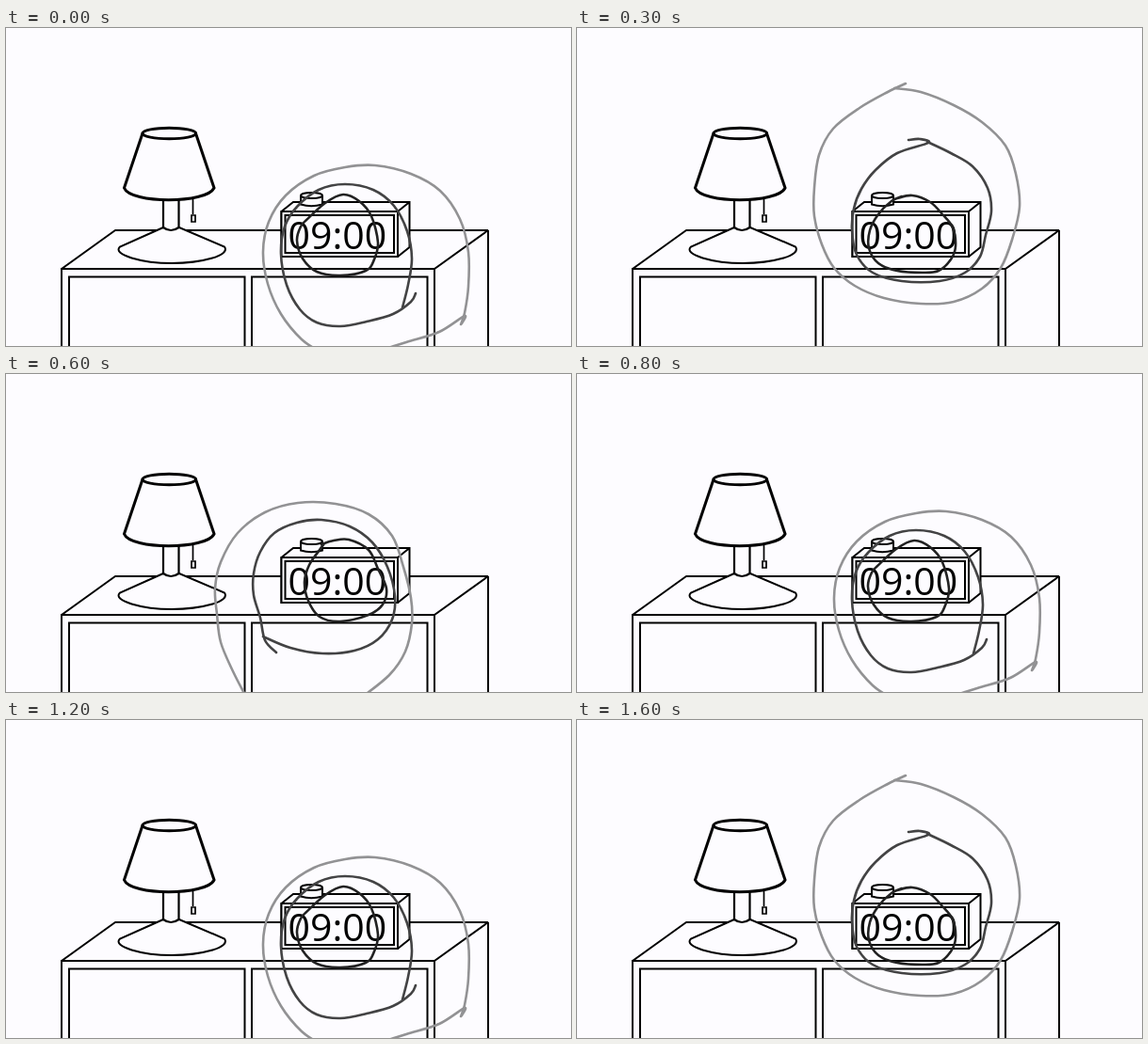
An HTML page for the animation above (1700 ms loop, 600 px wide and 338 px high).

```html
<!DOCTYPE html>
<html lang="en">
<head>
<meta charset="utf-8">
<title>Ringing alarm clock</title>
<style>
  html, body { margin: 0; width: 100%; height: 100%; overflow: hidden; background: #fdfcff; }
  svg { display: block; width: 600px; height: 338px; }
  .scene { fill: #fdfcff; stroke: #000; stroke-width: 2; }
  .lamp { stroke-width: 2.2; }
  .shade { stroke-width: 3; }
  .thin { stroke-width: 1.7; }
  text { font: 41px "Open Sans", "Noto Sans", sans-serif; fill: #000; stroke: none; }
  .pose { fill: none; stroke-width: 2.6; stroke-linecap: round; stroke-linejoin: round; }
  .pose :nth-child(1) { stroke: #222; }
  .pose :nth-child(2) { stroke: #434344; }
  .pose :nth-child(3) { stroke: #929294; }
</style>
</head>
<body>
<svg viewBox="0 0 600 338">
  <g class="scene">
    <!-- dresser -->
    <path d="M59 256L116 215H512L455 256M512 215V345" stroke-linejoin="bevel"/>
    <path d="M59 345V256H455V345M67 345V264.5H253.5V345M261 345V264.5H447.5V345"/>
    <!-- lamp -->
    <g class="lamp">
      <path d="M167 212L121 232.500C112 241 145 250 176 250C207 250 239 242 232 232.500L184 212Z" stroke-width="2"/>
      <path d="M167 180V212Q175 218 183.500 212V180"/>
      <path class="thin" d="M198.500 180V198M197 199H201V206H197Z"/>
      <g class="shade">
        <path d="M145 112L125.500 170C132 187 213 187 221 170L201.500 112Z"/>
        <ellipse cx="173.300" cy="112" rx="28.200" ry="5.800"/>
      </g>
    </g>
    <!-- clock -->
    <path d="M292.500 195L305 185H428.500V233L416 243H292.500ZM416 195L428.500 185"/>
    <path d="M292.500 195H416V243H292.500ZM296.500 199H412V239H296.500Z"/>
    <path d="M313 178V187.500Q324 191 336 187.500V178"/>
    <ellipse cx="324.500" cy="178" rx="11.500" ry="3"/>
    <text x="299.500" y="235">09:00</text>
  </g>

  <!-- sound rings, inner to outer -->
  <g class="pose">
    <polyline points="318,205 339,186 358,177 375,184 388,200 395,228 391,246 382,258 355,263 330,259 315,245 309,226 313,211 320,203"/>
    <polyline points="435,282 430,291 411,304 383,312 355,317 330,313 312,299 298,273 292,240 296,211 309,190 332,172 360,166 390,172 412,189 426,216 431,245 427,273 421,297"/>
    <polyline points="335,345 314,331 292,304 278,272 273,238 279,206 297,178 327,157 360,148 392,146 430,155 461,173 482,203 491,238 491,275 487,303 483,315 487,306 460,323 425,334 390,345"/>
  </g>
  <g class="pose">
    <polyline points="335,181 348,177 364,176 385,187 395,207 404,228 400,245 385,256 355,263 333,258 321,241 317,221 322,203 333,187 338,180"/>
    <polyline points="287,296 275,283 270,259 263,235 263,212 270,189 285,169 309,158 335,155 365,162 389,179 405,205 413,236 410,261 395,282 370,294 336,297 302,291 273,279"/>
    <polyline points="256,345 241,316 228,285 224,255 222,228 228,200 246,169 275,147 310,137 350,138 385,149 410,172 422,205 430,238 431,265 424,295 407,320 376,345"/>
  </g>
  <g class="pose">
    <polyline points="340,181 356,178 375,185 388,198 399,212 402,232 397,246 384,258 367,260 340,258 320,250 310,234 311,215 320,198 334,184 345,179"/>
    <polyline points="352,119 364,118 373,122 340,133 317,151 302,171 294,192 292,215 297,241 314,260 345,269 385,269 412,260 428,243 434,220 440,195 436,170 420,147 397,133 372,121"/>
    <polyline points="349,59 330,68 300,85 272,107 257,135 252,170 252,200 260,230 273,255 295,274 326,287 365,293 400,291 430,277 450,255 462,225 470,190 466,155 455,125 430,100 400,82 365,68 337,64"/>
  </g>
</svg>
<script>
  const STEP = 100;
  const ORDER = "ACBCACBCACBCACBAC"; // A: right, B: left, C: up
  const poses = [...document.querySelectorAll(".pose")];

  // Replace a polyline by a smooth curve through its points.
  function smooth(line) {
    const pts = [...line.points];
    const at = i => pts[Math.max(0, Math.min(pts.length - 1, i))];
    let d = `M${pts[0].x} ${pts[0].y}`;
    for (let i = 0; i < pts.length - 1; i++) {
      const [p, a, b, n] = [at(i - 1), at(i), at(i + 1), at(i + 2)];
      d += `C${a.x + (b.x - p.x) / 6} ${a.y + (b.y - p.y) / 6} ` +
           `${b.x - (n.x - a.x) / 6} ${b.y - (n.y - a.y) / 6} ${b.x} ${b.y}`;
    }
    const path = document.createElementNS("http://www.w3.org/2000/svg", "path");
    path.setAttribute("d", d);
    line.replaceWith(path);
  }
  document.querySelectorAll("polyline").forEach(smooth);

  function draw() {
    const step = Math.floor(performance.now() / STEP) % ORDER.length;
    const current = "ABC".indexOf(ORDER[step]);
    poses.forEach((pose, i) => pose.setAttribute("visibility", i === current ? "visible" : "hidden"));
    requestAnimationFrame(draw);
  }
  draw();
</script>
</body>
</html>
```
